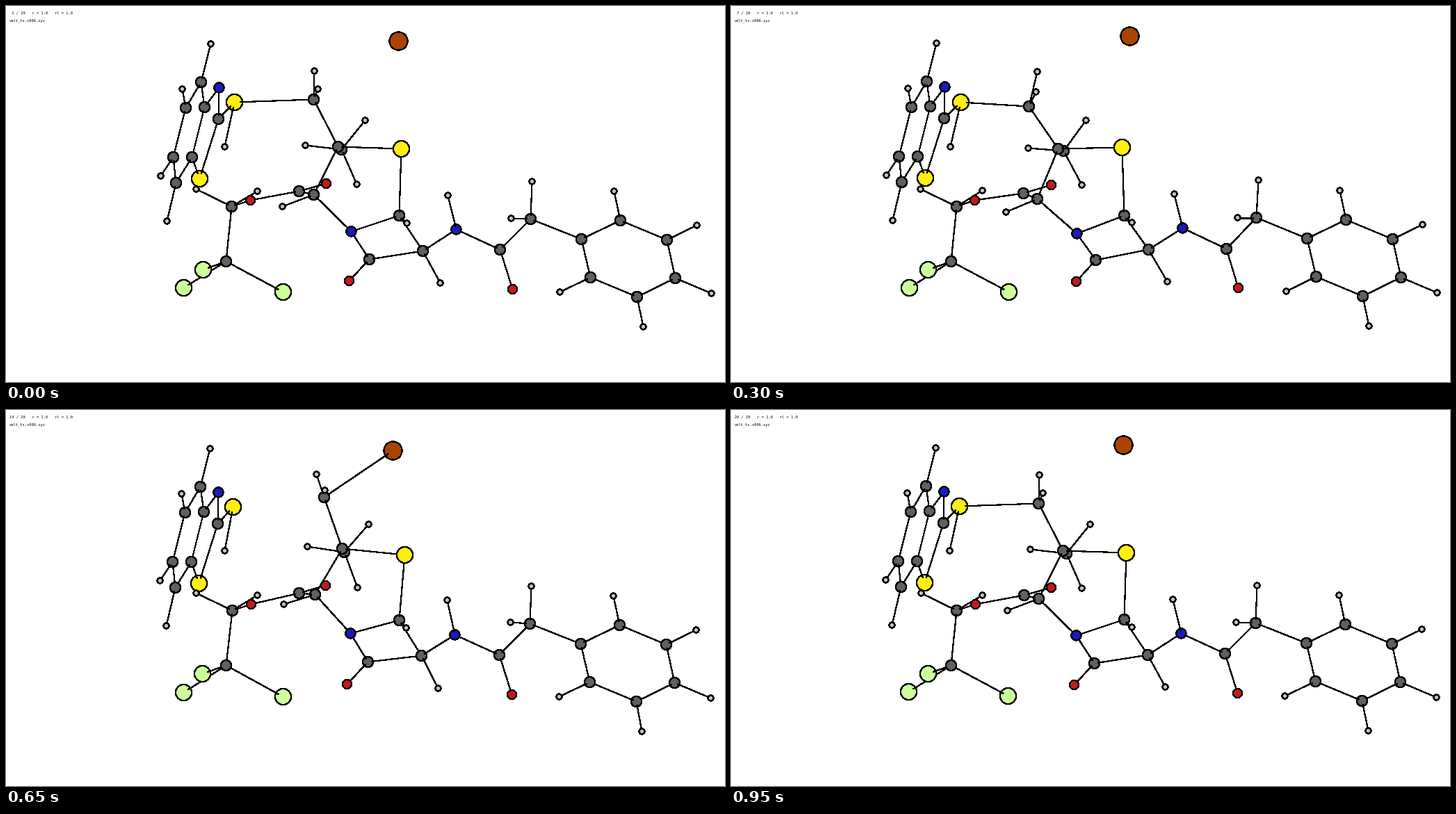
A matplotlib script that plays this animation: 1034x541 px, repeating every 1000 ms.

```python
import math

import matplotlib.pyplot as plt
from matplotlib.animation import FuncAnimation
from matplotlib.patches import Circle

W, H, DPI = 1034, 541, 64
PX = 72 / DPI  # one pixel in points
FRAMES, INTERVAL = 20, 50

# element: radius, colour, drawing depth (back to front)
STYLE = {
    "Br": (13, "#aa4400", 0),
    "S": (11.5, "#ffee11", 1),
    "Cl": (11.5, "#ccff99", 2),
    "C": (7.5, "#606060", 3),
    "N": (7, "#1a1abf", 4),
    "O": (6.5, "#c41a1a", 5),
    "H": (4, "#c0c0c0", 6),
}

# Rigid parts: shared swing, then atom: rest position.
FUSED_RINGS = (1, -1), {
    "H1": (293.8, 54.2), "C1": (279.8, 109), "H2": (253.2, 118.8),
    "C2": (257.6, 145.8), "C3": (284.8, 144.8), "N1": (305.9, 116.6),
    "C4": (305.4, 161.7), "C5": (239.7, 217.1), "C6": (266.8, 217.4),
    "H4": (222.2, 244.4), "C7": (244.3, 253.7), "H5": (230.7, 309),
    "S2": (277.7, 248.2),
}
PHENYL = (1.3, -1), {
    "C22": (827.1, 334.7), "C23": (883, 308.4), "H18": (873.7, 265.7),
    "C24": (950.1, 336), "H19": (993, 315), "C25": (962, 391),
    "H20": (1014.2, 412.8), "C26": (907, 417.7), "H21": (915.6, 460.6),
    "C27": (839.7, 389.8), "H22": (796.4, 411),
}

# Flexible parts, atom: rest position and swing.
BRIDGE = {
    "Br1": (564.4, 50.4, 9.4, -8.2), "S1": (328, 138.3, 2.2, -0.5),
    "H3": (314.1, 202.2, 0.5, 0), "C8": (442.4, 134.5, -16.2, 10),
    "H6": (443, 92.7, -3.6, 0.9), "H7": (448.3, 118.7, -11, 4.5),
    "C10": (481.7, 206, -4.5, 2.3), "C9": (476.6, 202.3, -7.5, 3.3),
    "H8": (515.6, 163.7, -6.2, 0), "H9": (430, 200.1, -3.8, 4.8),
    "H10": (504.2, 256.3, -0.4, 0.9), "S3": (567.7, 205.4, -6.1, -2.4),
}
ESTER = {
    "C11": (442, 271, -2.2, 6.5), "H11": (397, 287.7, -2, 9.3),
    "C12": (420.8, 266.1, -0.7, 3.4), "O1": (459.7, 254.7, 0.5, 2.9),
    "O2": (350.9, 279, -1.4, 0.2), "C13": (324.2, 288.2, -0.6, -0.3),
    "H12": (272.6, 263, -0.4, 0), "H13": (360.6, 265.6, 0, -0.3),
    "C14": (315.7, 367.2, 0.2, -0.2), "Cl1": (255.4, 405.3, 0.5, -0.4),
    "Cl2": (282.6, 378.9, 0.4, 0), "Cl3": (398.5, 411.4, 0.6, -0.6),
}
LACTAM = {
    "N2": (496, 323.6, 1.1, 3.2), "C15": (565, 301.3, 0, -0.8),
    "H14": (575.6, 312, 0.9, -1.5), "C16": (522, 363.5, 2.7, 1.3),
    "O3": (492.8, 395, 3.3, 1.5), "C17": (598.6, 351.7, 2, -1.7),
    "H15": (624.1, 398.1, 3.3, -2.4),
}
AMIDE = {
    "N3": (646.7, 321, 2.1, -2.2), "H16": (635.4, 271.5, 1.8, -1.6),
    "C20": (710.3, 350.1, 1.8, -1.7), "O4": (728, 407, 1.5, -1.7),
    "C21": (754, 305.7, 1.5, -1.6), "H17": (756.3, 251.8, 1.8, -1.5),
    "H23": (726.5, 304.6, 1.4, -0.9),
}

# Bonded chains of atoms; the last two bonds are listed apart, as they switch.
CHAINS = """
H1 C1 C2 C5 C7 C6 C3 C1
C2 H2
C5 H4
C7 H5
C3 N1 C4 S2 C6
C4 S1 H3
H6 C8 H7
C8 C9 C11 N2 C16 C17 C15 S3 C9
C9 C10
H8 C10 H9
C10 H10
H11 C11 C12 O1
C12 O2 C13 C14
H12 C13 H13
Cl1 C14 Cl2
C14 Cl3
N2 C15 H14
O3 C16
H15 C17 N3 H16
N3 C20 O4
C20 C21 C22 C23 C24 C25 C26 C27 C22
H17 C21 H23
H18 C23
H19 C24
H20 C25
H21 C26
H22 C27
"""
LEAVING, FORMING = ("C8", "S1"), ("C8", "Br1")
LEAVE_AT, FORM_AT = -0.4, -0.75


def element(name):
    return name.rstrip("0123456789")


atoms = {**BRIDGE, **ESTER, **LACTAM, **AMIDE}
for swing, part in (FUSED_RINGS, PHENYL):
    atoms.update({name: xy + swing for name, xy in part.items()})

bonds = [LEAVING, FORMING]
for chain in CHAINS.strip().splitlines():
    names = chain.split()
    bonds += zip(names, names[1:])


def depth(name):
    if name == "S3":  # lies in front of the carbons
        return 3.5
    return STYLE[element(name)][2]


order = sorted(atoms, key=depth)
rank = {name: 2 * i for i, name in enumerate(order)}

fig = plt.figure(figsize=(W / DPI, H / DPI), dpi=DPI, facecolor="white")
ax = fig.add_axes([0, 0, 1, 1])
ax.set_xlim(0, W)
ax.set_ylim(H, 0)
ax.axis("off")

balls = {}
for name in order:
    radius, colour, _ = STYLE[element(name)]
    balls[name] = ax.add_patch(Circle(
        (0, 0), radius, facecolor=colour, edgecolor="black",
        linewidth=1.2 * PX, antialiased=False, zorder=rank[name]))

sticks = {}
for a, b in bonds:
    sticks[a, b], = ax.plot(
        [], [], color="black", linewidth=1.2 * PX, antialiased=False,
        solid_capstyle="butt", zorder=min(rank[a], rank[b]) + 1)


def label(y):
    return ax.text(5, y, "", family="DejaVu Sans Mono", fontsize=5.4 * PX,
                   color="black", va="baseline", zorder=1000)


counter = label(11)
label(22).set_text("velt_ts.v006.xyz")


def inset(p, q, name):
    """Point on the way from p to q, a little inside the ball at p."""
    t = 0.66 * STYLE[element(name)][0] / math.dist(p, q)
    return p[0] + t * (q[0] - p[0]), p[1] + t * (q[1] - p[1])


def update(i):
    s = math.sin(2 * math.pi * i / (FRAMES - 1))
    pos = {name: (round(x + s * dx) + 0.5, round(y + s * dy) + 0.5)
           for name, (x, y, dx, dy) in atoms.items()}
    for name, ball in balls.items():
        ball.center = pos[name]
    for (a, b), stick in sticks.items():
        if math.dist(pos[a], pos[b]) > 0:
            ends = inset(pos[a], pos[b], a), inset(pos[b], pos[a], b)
            stick.set_data(*zip(*ends))
    sticks[LEAVING].set_visible(s > LEAVE_AT)
    sticks[FORMING].set_visible(s < FORM_AT)
    counter.set_text(f"{i + 1:2d} / {FRAMES}   r = 1.0   rl = 1.0")
    return [*balls.values(), *sticks.values(), counter]


anim = FuncAnimation(fig, update, frames=FRAMES, interval=INTERVAL,
                     repeat=True, repeat_delay=0, blit=False)
plt.show()
```
